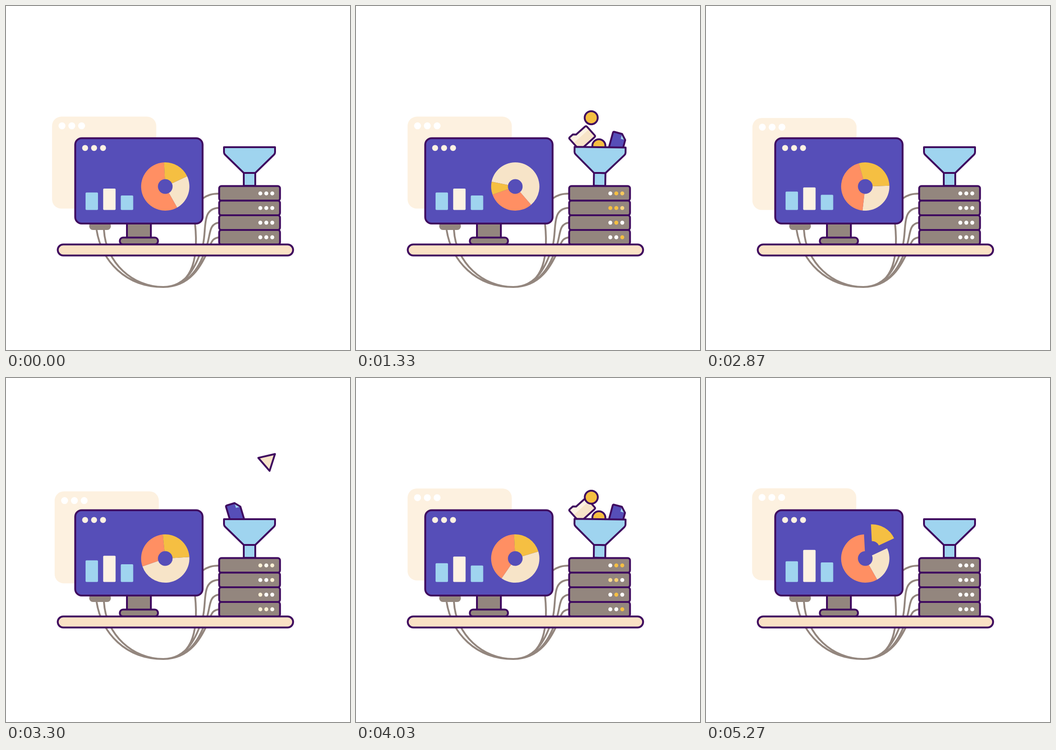
An HTML page with a canvas for the animation above (5.31 s loop, 748 px wide and 748 px high).

```html
<!DOCTYPE html>
<html lang="en">
<head>
<meta charset="utf-8">
<title>Data pipeline</title>
<style>
html, body { margin: 0; width: 100%; height: 100%; overflow: hidden; background: #fff; }
canvas { display: block; width: 748px; height: 748px; }
</style>
</head>
<body>
<canvas width="748" height="748"></canvas>
<script>
const ctx = document.querySelector('canvas').getContext('2d');
const LOOP = 5310, CYCLE = 2665, TURN = 2 * Math.PI;
const INK = '#3f0a5f', BLUE = '#564eb8', SKY = '#9fd4ef', GREY = '#93867e', YELLOW = '#f5bf42',
  ORANGE = '#ff8f63', TAN = '#f7e4c8', CREAM = '#fdf2e2', SHELF = '#fae2c5';

// Progress from 0 to 1, plain and eased.
const progress = (t, start, length) => Math.min(1, Math.max(0, (t - start) / length));
const ease = u => u * u * (3 - 2 * u);
const radians = degrees => degrees * Math.PI / 180;
const random = n => {
  const v = Math.sin(n * 12.9898) * 43758.5453;
  return v - Math.floor(v);
};

// Smooth interpolation without overshoot; keys are [time, value...].
function track(keys, t, col) {
  const last = keys.length - 1;
  if (t >= keys[last][0]) return keys[last][col];
  const i = keys.findIndex(k => k[0] > t) - 1;
  const rate = n => (keys[n + 1][col] - keys[n][col]) / (keys[n + 1][0] - keys[n][0]);
  const slope = n => {
    if (n === 0 || n === last) return 0;
    const a = rate(n - 1), b = rate(n);
    return a * b <= 0 ? 0 : 2 * a * b / (a + b);
  };
  const [t0, t1] = [keys[i][0], keys[i + 1][0]];
  const [v0, v1] = [keys[i][col], keys[i + 1][col]];
  const span = t1 - t0, u = (t - t0) / span;
  return v0 + (v1 - v0) * ease(u) + span * u * (1 - u) * ((1 - u) * slope(i) - u * slope(i + 1));
}

function paint(path, fill, stroke) {
  if (fill) { ctx.fillStyle = fill; ctx.fill(path); }
  if (stroke) { ctx.strokeStyle = stroke; ctx.lineWidth = 4; ctx.stroke(path); }
}
function box(x, y, w, h, r, fill, stroke) {
  const p = new Path2D();
  p.roundRect(x, y, w, h, r);
  paint(p, fill, stroke);
}
function disc(x, y, r, fill, stroke) {
  const p = new Path2D();
  p.arc(x, y, r, 0, TURN);
  paint(p, fill, stroke);
}
const shape = (d, fill, stroke) => paint(new Path2D(d), fill, stroke);

const ITEMS = {
  doc() {
    const outline = 'M-12-20H5L15-9V17Q15 20 12 20H-12Q-15 20-15 17V-17Q-15-20-12-20Z';
    shape(outline, BLUE);
    shape('M5-20L15-9H5Z', SKY);
    shape(outline, null, INK);
  },
  folder() {
    const outline = 'M-20-19H-11L-6-14H20Q23-14 23-11V14Q23 17 20 17H-20Q-23 17-23 14V-16Q-23-19-20-19Z';
    shape(outline, CREAM);
    shape('M-23-4H23V17H-23Z', TAN);
    shape(outline, null, INK);
  },
  coin() { disc(0, 0, 14.2, YELLOW, INK); },
  square() { box(-14.5, -14.5, 29, 29, 3, ORANGE, INK); },
  triangle() { shape('M-21-4L14-17L7 21Z', TAN, INK); }
};

// Kind, start time, x, resting y, angle, spin.
const FALLS = [
  ['doc', 270, 494, 320, -35, 25],
  ['triangle', 545, 570, 340, 0, 40],
  ['square', 695, 559, 335, 0, 30],
  ['folder', 665, 486, 286, 3, -45],
  ['doc', 865, 575, 298, 17, -2],
  ['coin', 650, 528, 304, 0, 0],
  ['coin', 1080, 510, 320, 0, 0]
];

// Time, then the start angles of the yellow, tan and orange slices.
const PIE = [[0, -3, 65, 150.5], [630, 53, 257, 402], [1330, 250, 281.5, 499], [2870, 344.5, 448, 546.5],
  [3630, 357, 444, 647], [4400, 357, 425, 510.5]];

const BARS = [
  { height: 38, pulse: 9, growth: 7, color: SKY },
  { height: 46.5, pulse: 10.5, growth: 23, color: CREAM },
  { height: 31.5, pulse: 7, growth: 11, color: SKY }
];

function backWindow(t) {
  const a = t / CYCLE * TURN;
  const x = 106.2 - 6 * Math.cos(a), y = 240.6 + 6 * Math.sin(a);
  box(x, y, 226.5, 200, 20, '#fdf1e0');
  for (let i = 0; i < 3; i++) disc(x + 21.6 + i * 21.3, y + 20, 7.5, '#fff');
}

function cables() {
  shape(`M197 487C208 555 260 611 342 611
    M213 487C217 558 275 611 342 611
    M411 473C420 560 400 611 342 611
    M427 419C438 411 448 408 463 408
    M463 439C424 440 437 485 428 520C416 560 395 611 342 611
    M463 471C441 474 445 495 437 520C424 562 400 611 342 611
    M463 503C450 505 448 511 444 520C426 566 400 611 342 611`, null, GREY);
}

function slice(from, to, color, pull = 0) {
  const start = radians(from - 90), end = radians(to - 90);
  const x = 346.3 + pull * .57, y = 392.5 - pull * .82;
  const p = new Path2D();
  p.arc(x, y, 52.5, start, end);
  p.arc(x, y, 16, end, start, true);
  p.closePath();
  paint(p, color);
}

function pie(t) {
  const [yellow, tan, orange] = [1, 2, 3].map(n => track(PIE, t, n));
  slice(tan, orange, TAN);
  slice(orange, yellow + 360, ORANGE);
  slice(yellow, tan, YELLOW, 26.5 * ease(progress(t, 4250, 640)));
}

function monitor(t) {
  box(181, 470, 47, 17, 8, GREY);
  box(263, 473, 52, 32, 0, GREY, INK);
  box(247.5, 503.5, 83, 15, 7, GREY, INK);
  box(150.5, 287.5, 277, 185.5, 14, BLUE, INK);
  const beat = Math.sin(t / 1330 * Math.PI) ** 2, late = ease(progress(t, 3700, 800));
  BARS.forEach((bar, i) => {
    const h = bar.height + bar.pulse * beat + bar.growth * late;
    disc(172 + i * 19.5, 308.7, 6.5, CREAM);
    box(173 + i * 38.3, 443.5 - h, 27, h, 2, bar.color);
  });
  pie(t);
}

// Lamps flicker at their own pace, most strongly while items drop in.
function lampColor(n, local) {
  const activity = Math.sin(local / CYCLE * Math.PI) ** 4;
  const rate = 5 + Math.floor(random(n) * 5);
  const wave = Math.sin(TURN * (rate * local / CYCLE + random(n + 50)));
  const level = activity * ease(progress(wave, -.3, .8));
  const mix = (a, b) => Math.round(a + (b - a) * level);
  return `rgb(${mix(255, 245)},${mix(255, 191)},${mix(255, 66)})`;
}

function servers(local) {
  for (let row = 0; row < 4; row++) {
    const y = 391.5 + row * 31.8;
    box(463.5, y, 132.3, 31.8, 5, GREY, INK);
    for (let i = 0; i < 3; i++) disc(553 + i * 13, y + 16, 4.3, lampColor(row * 3 + i + 1, local));
  }
}

// Items pop up, drop into the funnel, rest there and sink.
function fallingItems(local) {
  ctx.save();
  ctx.beginPath();
  ctx.rect(0, 0, 748, 307);
  ctx.clip();
  for (const [kind, start, x, rest, angle, spin] of FALLS) {
    const age = local - start;
    if (age <= 0 || age >= 920) continue;
    const fall = progress(age, 0, 500), sink = progress(age, 720, 200);
    const pop = progress(age, 0, 90) - 1;
    const size = 1 + 2.4 * pop ** 3 + 1.4 * pop ** 2;
    ctx.save();
    ctx.translate(x + (529 - x) * fall * .15, 165 + (rest - 165) * ease(fall) + 65 * ease(sink));
    ctx.rotate(radians(angle + spin * fall));
    ctx.scale(size, size);
    ITEMS[kind]();
    ctx.restore();
  }
  ctx.restore();
}

function funnel(local) {
  const u = progress(local, 650, 2000);
  ctx.save();
  ctx.translate(529.5, 391);
  ctx.rotate(radians(1.6 * (1 - u) * Math.sin(TURN * u)));
  shape('M-12.5-28H12.5V0H-12.5Z', SKY, INK);
  shape('M-55.5-84H55.5V-73Q55.5-70 53-67.5L12.5-28H-12.5L-53-67.5Q-55.5-70-55.5-73Z', SKY, INK);
  ctx.restore();
}

function frame(now) {
  const t = now % LOOP, local = t % CYCLE;
  ctx.fillStyle = '#fff';
  ctx.fillRect(0, 0, 748, 748);
  ctx.lineJoin = 'round';
  backWindow(t);
  cables();
  monitor(t);
  fallingItems(local);
  funnel(local);
  servers(local);
  box(112.5, 518.5, 511.8, 24, 12, SHELF, INK);
  requestAnimationFrame(frame);
}
requestAnimationFrame(frame);
</script>
</body>
</html>
```
